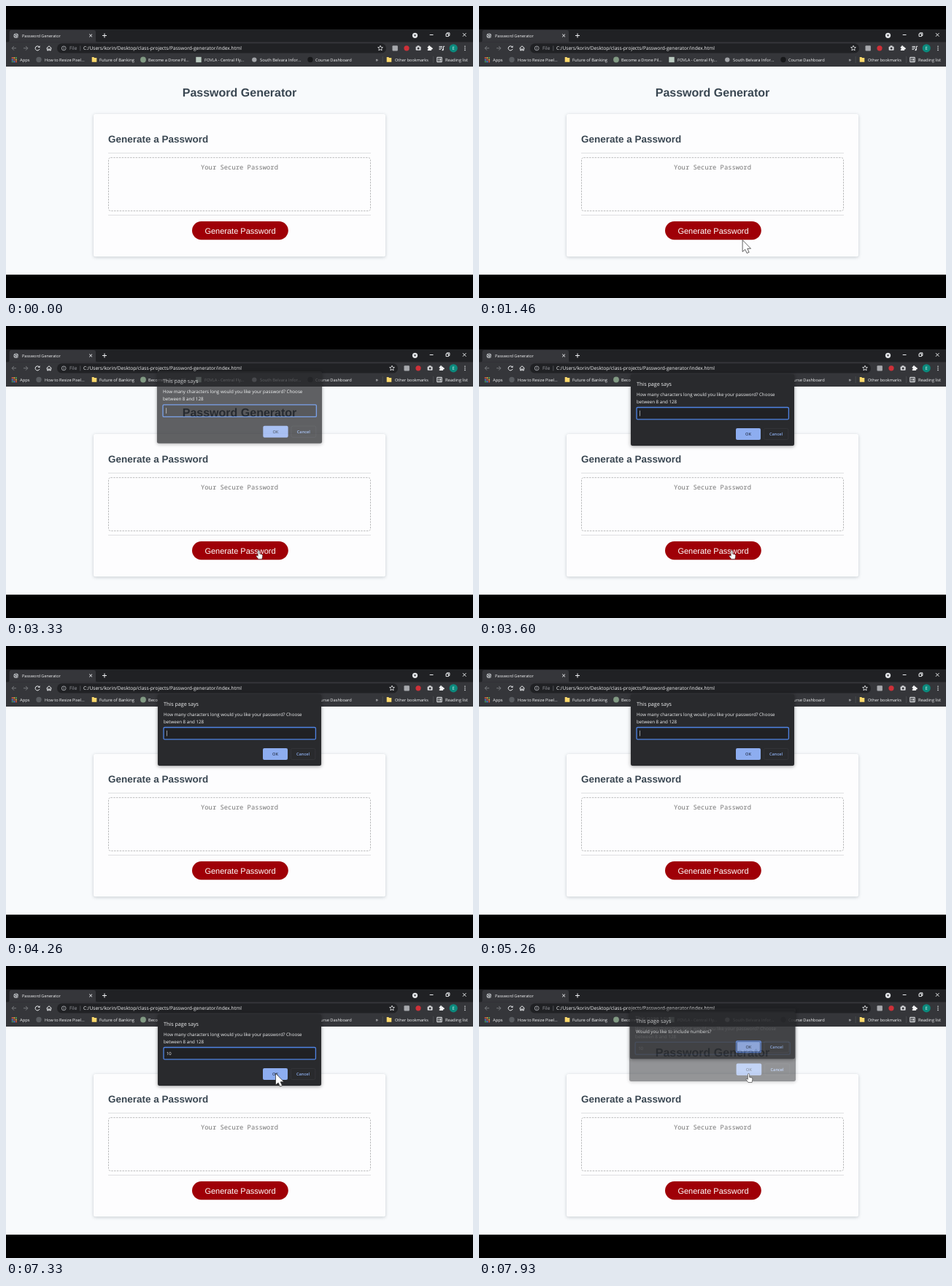
An HTML page that plays this animation: 640x400 px, repeating every 8000 ms.

```html
<!DOCTYPE html>
<html lang="en">
<head>
<meta charset="utf-8">
<title>Password Generator</title>
<style>
html, body { margin: 0; width: 100%; height: 100%; overflow: hidden; background: #000; }
svg { display: block; width: 640px; height: 400px; text-rendering: geometricPrecision; }
.ui { font-family: "Open Sans", "Noto Sans", sans-serif; }
.page { font-family: "Liberation Sans", Arial, sans-serif; }
.mono { font-family: "Noto Sans Mono", "DejaVu Sans Mono", monospace; }
.line { fill: none; stroke: #eceef0; stroke-width: 1; }
.dim { stroke: #77797d; }
.card { filter: drop-shadow(0 1px 2px rgba(30, 45, 60, .24)); }
.dialog { filter: drop-shadow(0 1.5px 2.5px rgba(0, 0, 0, .42)); }
</style>
</head>
<body>
<svg id="stage" viewBox="0 0 640 400" xmlns="http://www.w3.org/2000/svg"></svg>
<script>
const LOOP = 8000, STEP = 1000 / 15;

const text = (x, y, size, str, fill = '#f3f4f5', cls = 'ui', extra = '') =>
  `<text class="${cls}" x="${x}" y="${y}" font-size="${size}" fill="${fill}" ${extra}>${str}</text>`;
const rect = (x, y, w, h, fill, r = 0, extra = '') =>
  `<rect x="${x}" y="${y}" width="${w}" height="${h}" rx="${r}" fill="${fill}" ${extra}/>`;
const dot = (x, y, r, fill) => `<circle cx="${x}" cy="${y}" r="${r}" fill="${fill}"/>`;
const line = (d, cls = '', extra = '') => `<path class="line ${cls}" d="${d}" ${extra}/>`;
const group = (id, body, extra = '') => `<g id="${id}" ${extra}>${body}</g>`;
const folder = x => `<path d="M${x - 3.3} 70h2.6l.8 .9h3.2v5.8h-6.6z" fill="#fbd86b"/>`;

function tabStrip() {
  return rect(0, 32, 640, 52, '#202124') +
    '<path d="M2 49.5Q4.5 49.5 4.5 47V36Q4.5 33 7.5 33H120Q123 33 123 36V47Q123 49.5 125.5 49.5Z" fill="#35363a"/>' +
    dot(13.7, 40.8, 3.3, '#b4b7bb') +
    line('M10.8 40.2l2.4 1v2M13.5 37.8l-.4 1.4 2 .6 1.4 1.4-1.6 1.6', '', 'style="stroke:#46484c;stroke-width:.8"') +
    text(22, 42.8, 5.55, 'Password Generator') +
    line('M114.2 38.6l3.8 3.8m0-3.8l-3.8 3.8') +
    line('M132 40.5h6m-3-3v6') +
    dot(560.5, 40.3, 3.6, '#e3e5e8') + '<path d="M558.8 39.4h3.4l-1.7 2.3z" fill="#202124"/>' +
    line('M580.7 39.5h4.8') +
    line('M603 38h3.6v3.6H603zM604.2 37.8v-1h3.7v3.7h-1', '', 'stroke-width=".8"') +
    line('M626 37.2l4.5 4.5m0-4.5l-4.5 4.5', '', 'stroke-width=".8"');
}

function toolbar() {
  const star = 'M0-3.4L1-1.1 3.4-.9 1.6.8 2.1 3.2 0 1.9-2.1 3.2-1.6.8-3.4-.9-1-1.1Z';
  const camera = rect(561.6, 55.5, 7, 5.2, '#d6d8db', 1) + rect(563.5, 54.3, 3, 2, '#d6d8db') + dot(565.1, 58, 1.5, '#35363a');
  const puzzle = rect(577.7, 55.8, 5.4, 5.2, '#f0f1f2', .7) + dot(580.1, 55.5, 1.3, '#f0f1f2') + dot(583.5, 58.2, 1.2, '#f0f1f2') +
    dot(577.8, 58.4, 1, '#35363a');
  const tools = `<path class="line" style="stroke-width:.8" transform="translate(513 57.6)" d="${star}"/>` +
    rect(529.5, 54.2, 7.4, 7.4, '#a7a9ad', 1) + dot(549, 57.8, 3.6, '#cf3038') + camera + puzzle;
  const queue = line('M593.5 55.5h4.5m-4.5 2h4.5m-4.5 2h2.5M599.4 60v-4.7h1.8') + dot(598.5, 60.1, 1.2, '#e3e5e8');
  return rect(0, 49.4, 640, 34.6, '#35363a') +
    line('M14 57.8H8.2m2.7-2.8l-2.8 2.8 2.8 2.8', 'dim') +
    line('M24 57.8h5.8m-2.7-2.8l2.8 2.8-2.8 2.8', 'dim') +
    line('M45.6 56.2a3 3 0 1 0 .4 2.6') + '<path d="M46.5 54.3v2.8h-2.8z" fill="#e3e5e8"/>' +
    line('M55.5 58l3.5-3.2 3.5 3.2M56.7 57.3v3.6h1.5v-2h1.6v2h1.5v-3.6') +
    group('pill', rect(70, 51.2, 451, 13.4, '#202124', 6.7)) +
    '<circle class="line" cx="79.2" cy="57.9" r="2.9" style="stroke-width:.8;stroke:#b4b7bb"/>' +
    line('M79.2 57.5v2M79.2 56v.8', '', 'style="stroke:#b4b7bb;stroke-width:.8"') +
    text(87, 60.2, 6.5, 'File', '#9b9ea3') + rect(101.5, 54.5, .7, 7, '#66696e') +
    text(106, 60.2, 6.65, 'C:/Users/korin/Desktop/class-projects/Password-generator/index.html') +
    group('tools', tools) + group('queue', queue) +
    dot(613.2, 57.8, 5.6, '#0b8a7d') + text(613.2, 60, 6, 'E', '#d7f0ec', 'ui', 'text-anchor="middle"') +
    [55.2, 57.8, 60.4].map(y => dot(629, y, .8, '#e3e5e8')).join('');
}

function bookmarks() {
  const hues = ['#e8564a', '#f0b43c', '#48a862', '#4d8bea'];
  const apps = Array.from({ length: 9 }, (_, i) =>
    rect(7.8 + i % 3 * 2.6, 70.2 + Math.floor(i / 3) * 2.6, 1.8, 1.8, hues[i % 4])).join('');
  const labels = [
    [19, 5.78, 'Apps'], [53, 5.62, 'How to Resize Pixel...'], [128, 5.8, 'Future of Banking'],
    [195, 5.64, 'Become a Drone Pil...'], [272, 5.7, 'FOVLA - Central Fly...'],
    [348, 5.8, 'South Belvara Infor...'], [424, 5.73, 'Course Dashboard'],
    [533, 5.6, 'Other bookmarks'], [602, 5.8, 'Reading list']
  ];
  return apps + labels.map(([x, s, str]) => text(x, 75.6, s, str)).join('') +
    dot(45, 73.5, 3.7, '#595c60') + folder(121) + dot(188, 73.5, 3.9, '#819a83') +
    rect(260.3, 69.8, 7.4, 7.4, '#b9c9bf') + dot(340.3, 73.6, 3.2, '#a2a4a8') + dot(417, 73.5, 3.7, '#17181a') +
    text(506.5, 75.7, 7, '»') + rect(515.8, 69, .6, 9, '#55575b') + folder(525) + rect(585, 69, .6, 9, '#55575b') +
    line('M590.8 70.3h6.4v6.4h-6.4zM592.3 72.2h1m.9 0h2M592.3 73.6h1m.9 0h2M592.3 75h1m.9 0h2', '', 'stroke-width=".8"');
}

function page() {
  const ink = '#3a4752', bold = 'font-weight="700"';
  return rect(0, 83, 640, 285, '#f8fafc') +
    text(320, 123.6, 16, 'Password Generator', ink, 'page', bold + ' text-anchor="middle"') +
    rect(120, 148, 400, 195.3, '#fdfdfe', 2.5, 'class="card"') +
    text(140, 186.5, 13.5, 'Generate a Password', ink, 'page', bold) +
    rect(140, 201.2, 360, .8, '#d9dadb') + rect(140, 286.2, 360, .8, '#d9dadb') +
    rect(140.5, 207.7, 359, 73, 'none', 3, 'stroke="#b9babb" stroke-dasharray="2.4 1.4"') +
    text(320, 224, 8.83, 'Your Secure Password', '#767676', 'mono', 'text-anchor="middle"') +
    rect(255, 295, 131.8, 25.2, '#9f0007', 12.6) +
    text(321, 311.5, 11, 'Generate Password', '#fff', 'page', 'text-anchor="middle"');
}

function buttons(y, focused) {
  const label = (x, str, c) => text(x, y + 10, 5.6, str, c, 'ui', 'font-weight="600" text-anchor="middle"');
  const ring = rect(352.2, y + .2, 33.6, 15.6, 'none', 2, 'stroke="#4a72c6" stroke-width="1.4"') +
    rect(353.2, y + 1.2, 31.6, 13.6, 'none', 1.5, 'stroke="#2b3f66" stroke-width=".7"');
  return rect(352, y, 34, 16, '#8dadf0', 2) + (focused ? ring : '') +
    label(369, 'OK', '#2d3a55') +
    rect(390.4, y + .4, 33.4, 15.2, 'none', 2, 'stroke="#36383c" stroke-width=".8"') + label(407, 'Cancel', '#8fb1f3');
}

const panel = (h, body) => rect(208, 66, 224, h, '#292a2d', 2.5) + text(216, 81.6, 7.15, 'This page says') + body;

const lengthPrompt = () => panel(98,
  text(216, 95.7, 6.19, 'How many characters long would you like your password? Choose') +
  text(216, 105.7, 6.19, 'between 8 and 128') +
  rect(216, 111.5, 208.4, 16.4, '#202124', 1.5, 'stroke="#4f84e4" stroke-width="1.3"') +
  '<text id="typed" class="ui" x="220" y="122.2" font-size="5.9" fill="#f3f4f5"></text>' +
  '<rect id="caret" y="115.8" width=".8" height="7.6" fill="#b5b7ba"/>' + buttons(140, false));

const numbersPrompt = () => panel(64.5,
  text(216, 95.7, 6.2, 'Would you like to include numbers?') + buttons(106, true));

const arrow = '<path d="M0 0V16L3.6 12.9 6 18 9 16.8 6.7 11.7H11.4Z" fill="#fff" stroke="#222" stroke-width=".7"/>';
const hand = '<path d="M-1.1 1a1.1 1.1 0 0 1 2.2 0V4.8L4 5.4Q5.5 5.8 5.4 7.4L4.6 12H-.6L-3.3 8.2Q-3.6 6.8-2.2 6.9L-1.1 8Z" fill="#fff" stroke="#333" stroke-width=".6"/>';

document.getElementById('stage').innerHTML =
  rect(0, 0, 640, 400, '#000') + tabStrip() + toolbar() + bookmarks() + page() +
  group('ask', lengthPrompt(), 'class="dialog"') + group('next', numbersPrompt(), 'class="dialog"') +
  group('arrow', arrow) + group('hand', hand);

const $ = Object.fromEntries([...document.querySelectorAll('[id]')].map(e => [e.id, e]));
const pillRect = $.pill.firstChild;

// time, x, y, shape; positions ease between rows
const moves = [
  [0, 0, 0, ''],
  [1260, 362, 321, 'arrow'], [1530, 361, 320.5, 'arrow'], [1730, 355, 314, 'hand'], [2130, 346.3, 307.3, 'hand'],
  [3800, 346.3, 307.3, ''],
  [6800, 349, 302, 'arrow'], [7260, 369.5, 147, 'arrow'], [7790, 369.5, 147.5, 'hand'], [LOOP, 369.5, 147.5, 'hand']
];
// time, typed text, caret x (0 hides it)
const typing = [
  [0, '', 220.2], [3660, '', 0], [4195, '', 220.2], [4730, '', 0], [5260, '', 220.2], [5795, '', 0],
  [6055, '1', 223.6], [6195, '10', 227], [6795, '10', 0]
];

const clamp = v => Math.min(1, Math.max(0, v));
const show = (el, on) => { el.style.display = on ? '' : 'none'; };
const rowAt = (rows, t) => rows.findLastIndex(r => r[0] <= t);

function place(el, opacity) {
  const q = 1 - opacity;
  show(el, opacity > 0);
  el.style.opacity = opacity;
  el.setAttribute('transform', `translate(320 115) scale(${1 + .036 * q}) translate(-320 ${-115 - 13.5 * q})`);
}

function fadeIn(t, start) {
  const p = clamp((t - start) / 260);
  return 1 - (1 - p) ** 1.85;
}

const fadeOut = (t, start) => 1 - clamp((t - start) / 290) ** 1.9;

function pointer(t) {
  const i = rowAt(moves, t), [t0, x0, y0, shape] = moves[i], [t1, x1, y1] = moves[i + 1] || moves[i];
  const p = t1 > t0 ? clamp((t - t0) / (t1 - t0)) : 0, e = p * p * (3 - 2 * p);
  for (const name of ['arrow', 'hand']) {
    show($[name], name === shape);
    $[name].setAttribute('transform', `translate(${x0 + (x1 - x0) * e} ${y0 + (y1 - y0) * e})`);
  }
}

function draw(now) {
  const t = Math.floor((now % LOOP + 7) / STEP) * STEP;
  const wide = t >= 2590;
  $.tools.setAttribute('transform', `translate(${wide ? 16 : 0} 0)`);
  show($.queue, !wide);
  pillRect.setAttribute('width', wide ? 467 : 451);

  const [, typed, caretX] = typing[rowAt(typing, t)];
  $.typed.textContent = typed;
  show($.caret, caretX > 0);
  $.caret.setAttribute('x', caretX);

  place($.ask, fadeIn(t, 3200) * fadeOut(t, 7730));
  place($.next, fadeIn(t, 7795));
  pointer(t);
}

function tick() {
  draw(performance.now());
  requestAnimationFrame(tick);
}
tick();
</script>
</body>
</html>
```
